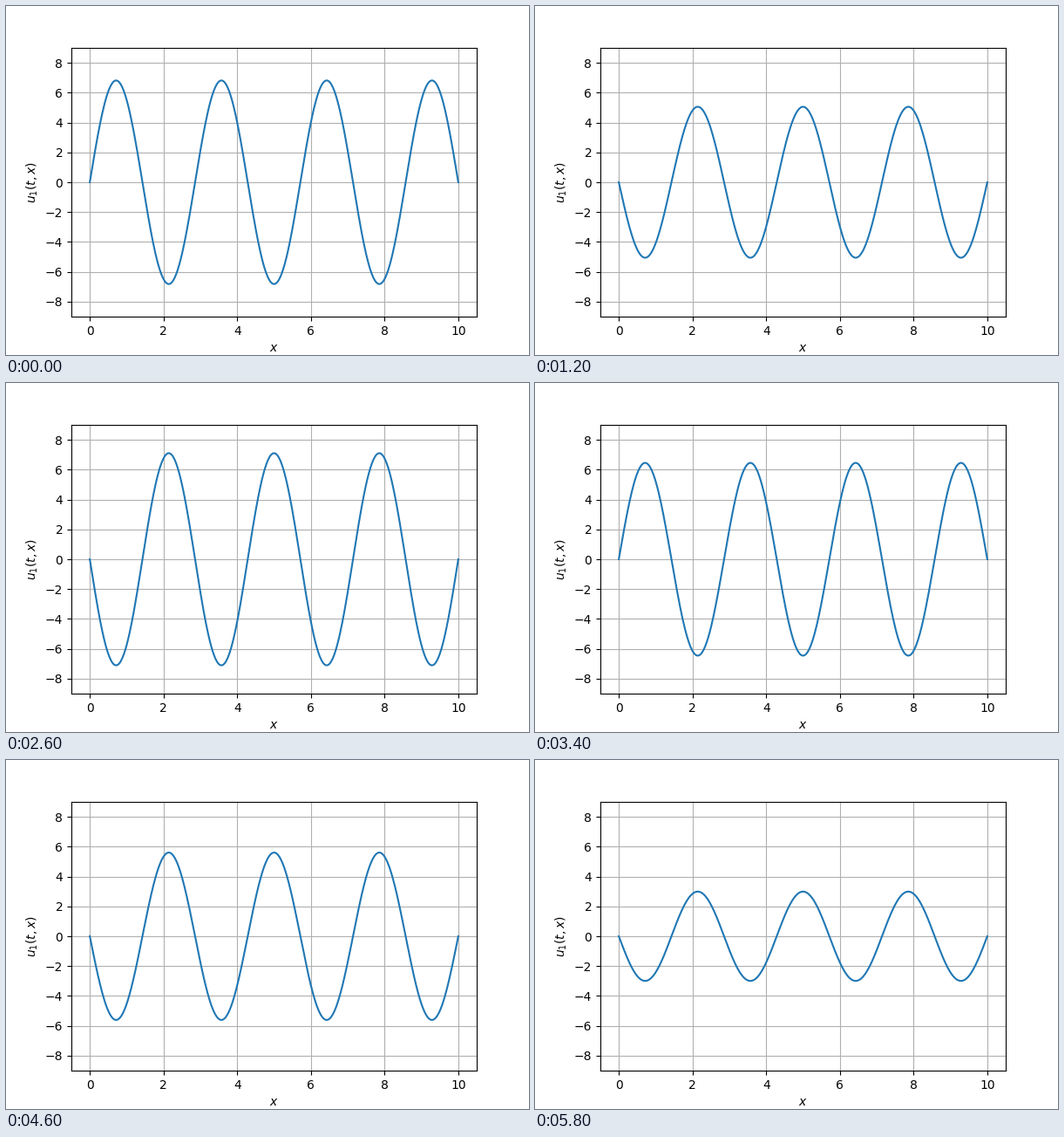
Animation, 600 px wide and 400 px high, one loop 6 s. Source, as a matplotlib script:

```python
import numpy as np
import matplotlib.pyplot as plt
from matplotlib.animation import FuncAnimation

FRAMES = 30
LOOP_MS = 6000
LENGTH = 10.0
DURATION = 10.0
STRENGTH = 3.1

k = 7 * np.pi / LENGTH  # wave number, equal to the frequency at unit speed
x = np.linspace(0, LENGTH, 500)
mode = np.sin(k * x)


def amplitude(t):
    return STRENGTH * (k * np.cos(k * t) + np.sin(k * t))


fig, ax = plt.subplots(figsize=(6, 4), dpi=100)
line, = ax.plot(x, amplitude(0) * mode, color="C0", lw=1.5)
ax.set_xlim(-0.05 * LENGTH, 1.05 * LENGTH)
ax.set_ylim(-9, 9)
ax.set_xlabel("$x$")
ax.set_ylabel("$u_1(t, x)$")
ax.grid(True)


def update(frame):
    line.set_ydata(amplitude(DURATION * frame / FRAMES) * mode)
    return line,


anim = FuncAnimation(fig, update, frames=FRAMES, interval=LOOP_MS / FRAMES,
                     repeat=True, repeat_delay=0)
plt.show()
```
